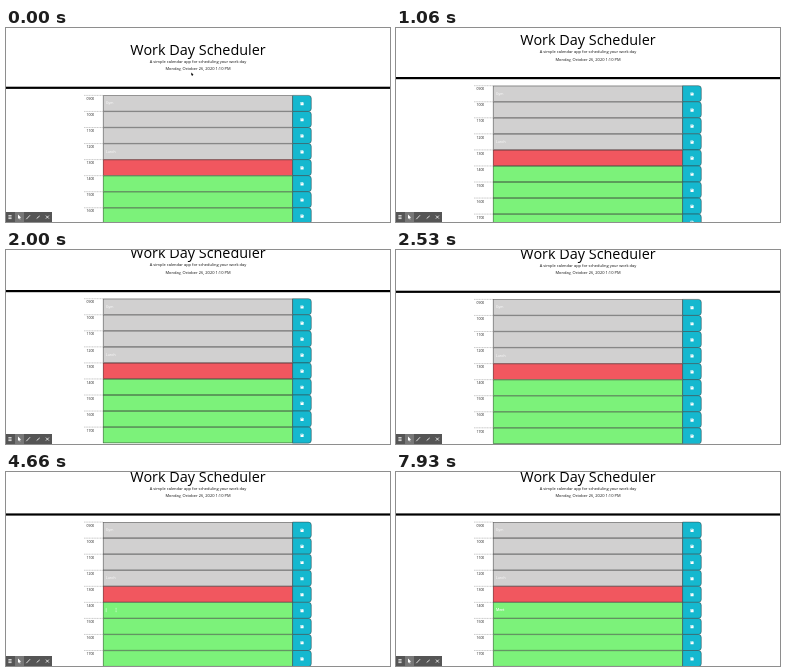
An HTML page that plays this animation: 384x194 px, repeating every 8 s.

```html
<!DOCTYPE html>
<html lang="en">
<head>
<meta charset="utf-8">
<title>Work Day Scheduler</title>
<style>
  html, body { margin: 0; width: 100%; height: 100%; overflow: hidden; background: #fff; }
  svg { display: block; width: 384px; height: 194px; }
  text { font-family: "Open Sans", sans-serif; fill: #111; }
  .mid { text-anchor: middle; font-size: 4px; }
  .title { font-size: 14.4px; fill: #000; }
  .hour { font-size: 3.4px; fill: #222; }
  .note { font-size: 3.4px; fill: #fff; }
  .past { fill: #d1d0d0; }
  .present { fill: #f1575f; }
  .future { fill: #7cf27a; }
  .save { fill: #15b8cf; }
  .edge { fill: none; stroke: #333; stroke-opacity: .75; stroke-width: .6; }
  .rule { stroke: #999; stroke-width: .5; stroke-dasharray: 1.2 .4; }
  .tool { fill: none; stroke: #fff; stroke-width: .8; stroke-linecap: round; }
</style>
</head>
<body>
<svg viewBox="0 0 384 194">
  <g id="page">
    <text class="mid title" x="192" y="26.9">Work Day Scheduler</text>
    <text class="mid" x="192" y="35.2">A simple calendar app for scheduling your work day</text>
    <text class="mid" x="192" y="42.3">Monday, October 26, 2020 1:10 PM</text>
    <rect y="58.7" width="384" height="2.2"/>
    <g id="rows"></g>
    <text class="note" id="entry" x="100" font-weight="600"></text>
    <path id="caret" stroke="#fff" stroke-width=".5"/>
  </g>
  <path id="pointer" d="M185.3 44.4v3.2l.8-.7 .5 1.1 .5-.2 -.5-1.1h1z"/>
  <path id="beam" d="M109.5 136.3h1.2M110.1 136.3v3.4M109.5 139.7h1.2" fill="none" stroke="#e8ffe8" stroke-width=".4"/>
  <g id="toolbar">
    <rect y="184" width="46" height="10" fill="#555"/>
    <rect x="9" y="184" width="9" height="10" fill="#777"/>
    <path class="tool" d="M2.8 187.6h2.4M2.8 189.1h2.4M2.8 190.6h2.4"/>
    <path d="M12 186.4v4.6l1.1-1 .7 1.6 .7-.3 -.7-1.5h1.4z" fill="#fff"/>
    <path class="tool" d="M20.6 190.9l3.2-3.4"/>
    <path class="tool" d="M31 190.2l2.4-2" stroke-width="2"/>
    <path class="tool" d="M40.2 187.9l2.4 2.4M42.6 187.9l-2.4 2.4"/>
  </g>
</svg>
<script>
  const LOOP = 8000, TOP = 67.4, ROW = 16.05, WORD = "Meet";
  const $ = id => document.getElementById(id);
  const notes = { 9: "Gym", 12: "Lunch" };

  const row = (hour, i) => {
    const y = TOP + i * ROW, h = ROW;
    const kind = hour < 13 ? "past" : hour === 13 ? "present" : "future";
    const button = `M286.6 ${y}h15.7q3 0 3 3v${h - 6}q0 3-3 3h-15.7z`;
    return `
      <path class="rule" d="M78 ${y}h19"/>
      <text class="hour" x="80.5" y="${y + 4.7}">${String(hour).padStart(2, "0")}00</text>
      <rect class="${kind}" x="97" y="${y}" width="189.6" height="${h}"/>
      <rect class="edge" x="97.2" y="${y + .3}" width="189.2" height="${h - .6}"/>
      <text class="note" x="100" y="${y + 9}">${notes[hour] || ""}</text>
      <path class="save" d="${button}"/>
      <path class="edge" d="${button}"/>
      <path d="M294.5 ${y + 6.7}h2.4l.7.7v2.5h-3.1z" fill="#fff"/>
      <path d="M295 ${y + 7.4}h1.6" stroke="#15b8cf" stroke-width=".5"/>`;
  };
  $("rows").innerHTML = Array.from({ length: 9 }, (_, i) => row(9 + i, i)).join("");

  // [start, end, from, to, steps]; the page overshoots its end and springs back
  const scrolls = [
    [593, 799, 0, 4, 3],
    [799, 1259, 4, 17.3, 7],
    [1333, 1859, 17.3, 18.6, 8],
    [1933, 1999, 18.6, 18.7, 1],
    [2133, 2799, 18.7, 17.3, 10]
  ];
  const scrollAt = t => {
    let y = 0;
    for (const [start, end, from, to, n] of scrolls) {
      if (t < start) break;
      const p = Math.min(1, (t - start) / (end - start));
      y = from + (to - from) * Math.floor(p * n + 1e-6) / n;
    }
    return y;
  };

  const show = (el, on) => el.setAttribute("visibility", on ? "visible" : "hidden");
  const entryY = TOP + 5 * ROW + 9;
  $("entry").setAttribute("y", entryY);

  function draw() {
    const t = performance.now() % LOOP;
    $("page").setAttribute("transform", `translate(0 ${-scrollAt(t)})`);

    const count = t < 5060 ? 0 : Math.min(WORD.length, 1 + Math.floor((t - 5060) / 260));
    const typed = WORD.slice(0, count);
    if ($("entry").textContent !== typed) $("entry").textContent = typed;
    const x = 100.2 + (count ? $("entry").getComputedTextLength() : 0);
    $("caret").setAttribute("d", `M${x} ${entryY - 3.2}v4`);

    show($("caret"), t >= 4400 && t < 6400);
    show($("pointer"), t < 660);
    show($("beam"), t >= 4330 && t < 5060);
    requestAnimationFrame(draw);
  }
  draw();
</script>
</body>
</html>
```
